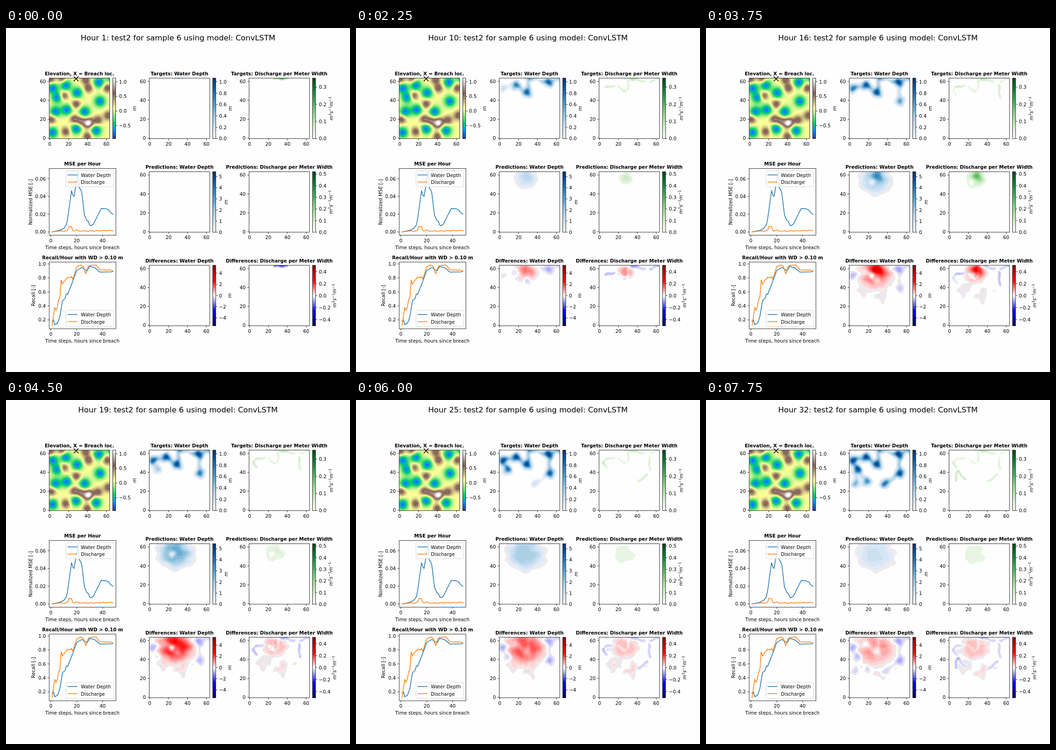
Animation of 748x748 px, one loop 8 s. Source, as an HTML page with a canvas:

```html
<!DOCTYPE html>
<html lang="en">
<head>
<meta charset="utf-8">
<title>Flood model panels</title>
<style>
html, body { margin: 0; width: 100%; height: 100%; overflow: hidden; background: #fefefe; }
canvas, svg { position: absolute; left: 0; top: 0; width: 748px; height: 748px; }
text { font-family: "DejaVu Sans", sans-serif; font-size: 10.39px; fill: #000; }
.title { font-weight: bold; }
.head { font-size: 16.62px; }
.unit { font-style: italic; }
.unit tspan { font-style: normal; font-size: 7.27px; }
.axis { fill: none; stroke: #000; stroke-width: .83; }
.curve { fill: none; stroke-width: 1.56; stroke-linejoin: round; stroke-linecap: square; }
</style>
</head>
<body>
<canvas id="fields" width="748" height="748"></canvas>
<svg id="chart" viewBox="0 0 748 748"></svg>
<script>
const ctx = document.getElementById('fields').getContext('2d', { willReadFrequently: true });
const SIZE = 131.5, N = 131, CELL = SIZE / 64, STEP = 250, HOURS = 32;
const BLUE = '#1f77b4', ORANGE = '#ff7f0e';

// ---- colour maps ----
function colourMap(colours, stops) {
  const c = document.createElement('canvas');
  c.width = 256; c.height = 1;
  const g = c.getContext('2d'), grad = g.createLinearGradient(0, 0, 256, 0);
  colours.split(' ').forEach((col, i, all) =>
    grad.addColorStop(stops ? stops[i] : i / (all.length - 1), '#' + col));
  g.fillStyle = grad;
  g.fillRect(0, 0, 256, 1);
  const { data } = g.getImageData(0, 0, 256, 1);
  return v => {
    const k = 4 * Math.max(0, Math.min(255, Math.round(v * 255)));
    return [data[k], data[k + 1], data[k + 2]];
  };
}
const terrain = colourMap('333399 0099ff 00cc66 ffff99 805c54 ffffff', [0, .15, .25, .5, .75, 1]);
const blues = colourMap('fffafa deebf7 c6dbef 9ecae1 6baed6 4292c6 2171b5 08519c 08306b');
const greens = colourMap('fffcfa e5f5e0 c7e9c0 a1d99b 74c476 41ab5d 238b45 006d2c 00441b');
const seismic = colourMap('00004d 0000ff ffffff ff0000 800000');

const PAPER = [254, 254, 254], GREY = [236, 232, 235], ROSE = [241, 234, 237];
const band = (v, n) => Math.round(v * n) / n;
const water = v => v < .05 ? PAPER : blues(v);
const stream = v => v < .09 ? PAPER : greens(band(v, 20));
const guessDepth = v => v < .045 ? PAPER : v < .085 ? ROSE : blues(band(v, 18));
const guessFlow = v => v < .08 ? PAPER : greens(band(v, 18));
const delta = v => {
  const m = Math.abs(v);
  return m < .025 ? PAPER : m < .055 ? GREY : seismic(.5 + band(v, 24) / 2);
};

// ---- maths helpers ----
const bump = (h, centre, width) => Math.exp(-(((h - centre) / width) ** 2));
const rise = (h, start, tau) => h > start ? 1 - Math.exp((start - h) / tau) : 0;
const merge = (a, b) => 1 - (1 - a) * (1 - b);
const gauss = (x, y, cx, cy, r) => Math.exp(-((x - cx) ** 2 + (y - cy) ** 2) / (r * r));

function segment2(x, y, [x1, y1], [x2, y2], from = 0, to = 1) {
  const dx = x2 - x1, dy = y2 - y1;
  const t = Math.max(from, Math.min(to, ((x - x1) * dx + (y - y1) * dy) / (dx * dx + dy * dy)));
  return (x - x1 - t * dx) ** 2 + (y - y1 - t * dy) ** 2;
}
const hash = (i, j) => { const s = Math.sin(i * 127.1 + j * 311.7) * 43758.5453; return s - Math.floor(s); };
function noise(x, y) {
  const i = Math.floor(x), j = Math.floor(y), u = x - i, v = y - j;
  const a = u * u * (3 - 2 * u), b = v * v * (3 - 2 * v);
  const row = k => hash(i, k) + (hash(i + 1, k) - hash(i, k)) * a;
  return row(j) + (row(j + 1) - row(j)) * b;
}

// ---- landscape: water runs down each chain of basins [x, y, arrival hour] ----
const BREACH = [31, 63, 0];
const rivers = [
  [BREACH, [29, 48, 1], [17, 56, 4], [3, 53, 9], [8, 43, 17], [6, 28, 29]],
  [BREACH, [52, 59, 1], [53, 39, 12], [37, 28, 24]],
  [[52, 59, 1], [66, 65, 4]],
  [[8, 43, 17], [18, 30, 27]]
];
const reaches = rivers.flatMap(r => r.slice(1).map((end, i) => ({ start: r[i], end, arrive: end[2] })));
const basins = [...reaches.map(r => r.end), [3, 6], [28, 10], [49, 8]];
const peaks = [
  [1, 62], [13, 63], [38, 62], [41, 53], [61, 53], [15, 45], [28, 36], [26, 20],
  [33, 18], [40, 15], [42, 17], [51, 19], [40, 2], [17, 7], [2, 20], [62, 24]
];

function height(x, y) {
  let h = .08;
  for (const [cx, cy] of basins) h -= .82 * gauss(x, y, cx, cy, 5.6);
  for (const [cx, cy] of peaks) h += .6 * gauss(x, y, cx, cy, 4.8);
  return h;
}
const inlet = (x, y) => Math.exp(-segment2(x, y, [27, 63.5], [39, 63.5]) / 3);

function waterDepth(x, y, h, ground) {
  let d = .25 * inlet(x, y);
  for (const { start, end, arrive } of reaches) {
    const fill = rise(h, arrive, 5);
    if (!fill) continue;
    d = merge(d, .85 * fill * gauss(x, y, end[0], end[1], 4.4));
    d = merge(d, .35 * fill * Math.exp(-segment2(x, y, start, end) / 6));
  }
  return Math.max(0, d - .25 * Math.max(0, ground));
}

function waterFlow(x, y, h, n) {
  let q = (.2 + .35 * Math.exp((1 - h) / 2)) * inlet(x, y);
  for (const { start, end, arrive } of reaches) {
    const power = rise(h, arrive - 2, 2) * (.12 + .1 * Math.exp((arrive - h) / 8));
    if (h > 1 && power) q = merge(q, power * (.7 + .6 * n) * Math.exp(-((segment2(x, y, start, end, .15, .8) / 2.4) ** 2)));
  }
  return q;
}

// Round plume that spreads from the breach, with a hot core and a dry hole.
function plume(x, y, h, n, reach, level, coreWidth) {
  const grow = rise(h, 2.5, 9), late = rise(h, 11, 6);
  if (!grow) return 0;
  const d = Math.hypot((x - 29 + 3 * grow) / 1.15, y - 62 + 10 * grow) + 7 * (n - .5) * late;
  const body = level * Math.exp(-((Math.max(0, d) / (reach * grow)) ** 3));
  const core = .7 * bump(h, 14.5, coreWidth) * gauss(x, y, 29, 59, 6);
  return merge(body, core) * (1 - .9 * bump(h, 17, 5) * gauss(x, y, 23, 53, 3.4));
}
// Weak patches far from the plume, visible in the differences only.
const traces = (x, y, h, n) =>
  .1 * rise(h, 12, 4) * Math.max(0, n - .45) * Math.exp(-((Math.hypot(x - 30, y - 43) / 24) ** 4)) / .55;

// ---- painting ----
const grid = Array.from({ length: N * N }, (_, k) => {
  const u = (k % N + .5) / CELL - .5, v = 63.5 - (Math.floor(k / N) + .5) / CELL;
  return { x: u + .5 * Math.sin(v * .55), y: v + .5 * Math.sin(u * .6), ground: height(u, v) };
});

function paint(x, y, colourAt) {
  const img = ctx.createImageData(N, N);
  grid.forEach((p, k) => img.data.set([...colourAt(p), 255], k * 4));
  ctx.putImageData(img, x, y);
}

function drawHour(h) {
  for (const p of grid) {
    const { x, y } = p, n = noise(x / 7 + 3, y / 6 + h * .06);
    p.depth = waterDepth(x, y, h, p.ground);
    p.flow = waterFlow(x, y, h, n);
    p.depthGuess = plume(x, y, h, n, 17, .2 + .33 * bump(h, 21, 4.5), 3.5);
    p.flowGuess = plume(x, y, h, n, 11, .13 + .07 * bump(h, 9, 6), 2.6);
    p.trace = traces(x, y, h, n);
  }
  paint(312, 109, p => water(p.depth));
  paint(529, 109, p => stream(p.flow));
  paint(312, 313, p => guessDepth(p.depthGuess));
  paint(529, 313, p => guessFlow(p.flowGuess));
  paint(312, 516, p => delta((p.depthGuess * 5.45 - p.depth * 1.065) / 5.4 + p.trace));
  paint(529, 516, p => delta((p.flowGuess * .52 - p.flow * .352) / .506 + p.trace));
}

// ---- axes, labels and curves ----
let svg = '';
const text = (x, y, s, anchor = 'middle', more = '') =>
  svg += `<text x="${x}" y="${y}" text-anchor="${anchor}" ${more}>${s}</text>`;
const line = d => svg += `<path class="axis" d="${d}"/>`;
const box = (x, y, w, h) => svg += `<rect class="axis" x="${x}" y="${y}" width="${w}" height="${h}"/>`;
const upright = (x, y, s, cls = '') => text(0, 0, s, 'middle', `class="${cls}" transform="translate(${x} ${y}) rotate(-90)"`);
const title = (x, y, s) => text(x, y, s, 'middle', 'class="title"');
const xTick = (x, y, s) => { line(`M${x} ${y}v3.6`); text(x, y + 15.2, s); };
const yTick = (x, y, s) => { line(`M${x} ${y}h-3.6`); text(x - 7.3, y + 3.8, s, 'end'); };

const sup = s => `<tspan dy="-4">${s}</tspan>`;
const base = s => `<tspan dy="4" style="font:inherit">${s}</tspan>`;
const RATE = 'm' + sup('3') + base('s') + sup('−1') + base('m') + sup('−1');

function panel(x, y, name, map, lo, hi, step, digits, unit, unitX) {
  const bar = x + 138;
  title(x + SIZE / 2, y - 6.2, name);
  box(x, y, SIZE, SIZE);
  for (let v = 0; v <= 60; v += 20) {
    xTick(x + (v + .5) * CELL, y + SIZE, v);
    yTick(x, y + SIZE - (v + .5) * CELL, v);
  }
  for (let i = 0; i <= N; i++) {
    ctx.fillStyle = `rgb(${map(1 - i / N)})`;
    ctx.fillRect(Math.round(bar), Math.round(y) + i, 6, 1);
  }
  box(bar, y, 6.6, SIZE);
  for (let n = Math.ceil(lo / step); n * step <= hi; n++) {
    const v = n * step, ty = y + SIZE * (hi - v) / (hi - lo);
    line(`M${bar + 6.6} ${ty}h3.6`);
    text(bar + 13.8, ty + 3.8, v.toFixed(digits).replace('-', '−'), 'start');
  }
  upright(unitX, y + 66, unit, 'unit');
}

function graph(y, name, label, labelX, ticks, yOf, curves, legendY) {
  const xOf = v => 97.5 + v * 2.8125;
  title(166.5, y - 6.2, name);
  curves.forEach((keys, i) => {
    const pts = keys.map(([h, v]) => `${xOf(h)},${yOf(v)}`).join(' ');
    svg += `<polyline class="curve" stroke="${i ? ORANGE : BLUE}" points="${pts}"/>`;
  });
  box(94, y, 145, 145);
  for (const v of [0, 20, 40]) xTick(xOf(v), y + 145, v);
  for (const s of ticks) yTick(94, yOf(+s), s);
  text(166, y + 175, 'Time steps, hours since breach');
  upright(labelX, y + 73, label);
  svg += `<rect x="130.5" y="${legendY}" width="103.7" height="34.7" rx="2" fill="#fff" fill-opacity=".8" stroke="#ccc" stroke-opacity=".8"/>`;
  ['Water Depth', 'Discharge'].forEach((s, i) => {
    const ly = legendY + 9 + i * 15.5;
    svg += `<path class="curve" stroke="${i ? ORANGE : BLUE}" d="M134.5 ${ly}h20"/>`;
    text(162.8, ly + 4, s, 'start');
  });
}

const ripple = Array.from({ length: 24 }, (_, i) => [25 + i, .001 + .0004 * Math.sin(i * 1.3) + .00003 * i]);
const mse = [
  [[1, 0], [7, .0018], [10, .004], [12, .008], [13, .015], [16, .0465], [17, .0415], [18, .04], [21, .068],
    [22, .0495], [23, .048], [24, .0435], [26, .019], [28, .0125], [29, .012], [30, .008], [31, .007], [33, .009],
    [36, .018], [39, .0265], [43, .026], [45, .0245], [46, .022], [48, .02]],
  [[1, 0], [8, .0013], [10, .0006], [13, .002], [14, .0064], [16, .006], [17, .0015], [18, .001], [20, .0025],
    [22, .0009], ...ripple]
];
const recall = [
  [[1, .18], [2, .2], [3, .13], [5, .15], [6, .19], [7, .25], [9, .475], [11, .505], [12, .57], [13, .565], [16, .705],
    [20, .905], [24, .95], [28, .9], [30, .965], [34, .945], [38, .883], [47, .887], [48, .895]],
  [[1, .12], [3, .38], [4, .335], [5, .38], [6, .485], [7, .52], [8, .77], [9, .71], [10, .745], [13, .81], [15, .8],
    [16, .82], [17, .78], [20, .96], [23, .983], [25, .967], [27, .86], [29, .967], [31, .98], [35, .985],
    [38, .915], [46, .912], [48, .9]]
];

svg += '<text id="head" class="head" x="374" y="27" text-anchor="middle"></text>';
panel(94, 109, 'Elevation, X = Breach loc.', terrain, -.943, 1.124, .5, 1, 'm', 283);
panel(311.5, 109, 'Targets: Water Depth', blues, 0, 1.065, .2, 1, 'm', 491);
panel(528.5, 109, 'Targets: Discharge per Meter Width', greens, 0, .352, .1, 1, RATE, 711);
panel(311.5, 312.5, 'Predictions: Water Depth', blues, 0, 5.45, 1, 0, 'm', 482);
panel(528.5, 312.5, 'Predictions: Discharge per Meter Width', greens, 0, .52, .1, 1, RATE, 710);
panel(311.5, 516, 'Differences: Water Depth', seismic, -5.4, 5.4, 2, 0, 'm', 490);
panel(528.5, 516, 'Differences: Discharge per Meter Width', seismic, -.506, .506, .2, 1, RATE, 718);
graph(305.5, 'MSE per Hour', 'Normalized MSE [-]', 56.5, ['0.00', '0.02', '0.04', '0.06'], v => 443.5 - v * 1930, mse, 310.5);
graph(509, 'Recall/Hour with WD &gt; 0.10 m', 'Recall [-]', 63, ['0.2', '0.4', '0.6', '0.8', '1.0'], v => 513 + (1 - v) * 152, recall, 614);
svg += '<path d="M147.3 105.3l10.4 10.4m0-10.4l-10.4 10.4" stroke="#000" stroke-width="1.56"/>';
document.getElementById('chart').innerHTML = svg;
paint(94, 109, p => terrain((p.ground + .943) / 2.067));

const head = document.getElementById('head');
let shown = 0;
function tick() {
  const hour = 1 + Math.floor(performance.now() / STEP) % HOURS;
  if (hour !== shown) {
    shown = hour;
    head.textContent = `Hour ${hour}: test2 for sample 6 using model: ConvLSTM`;
    drawHour(hour);
  }
  requestAnimationFrame(tick);
}
tick();
</script>
</body>
</html>
```
